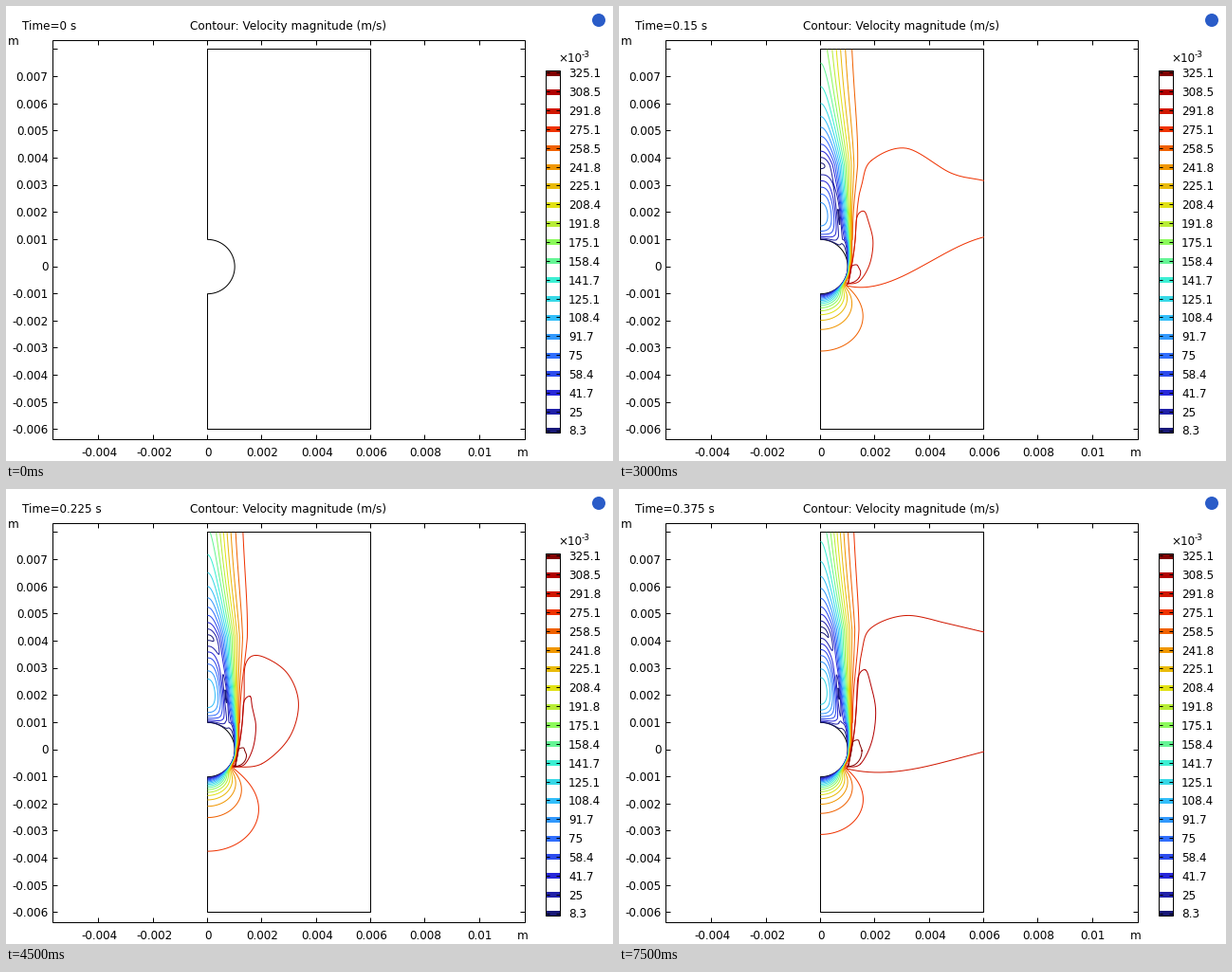
Recreate the animation shown at these times as a matplotlib script. Size 640 by 480 pixels, loop 8000 ms.

```python
import numpy as np
import matplotlib.pyplot as plt
from matplotlib.animation import FuncAnimation
from matplotlib.colors import LinearSegmentedColormap
from matplotlib.patches import Circle, Rectangle

W, H, FRAMES, STEP = 640, 480, 16, 500
PX = 0.72                      # one pixel in points at 100 dpi
X0, Y0, MM = 212.5, 275.0, 28.65
RIGHT, TOP, BOTTOM = 384.5, 45.5, 446.5

LEVELS = (8.341 + 16.674 * np.arange(20)) / 1000
STOPS = np.array([*range(0, 19, 2), 19]) / 19
RAINBOW = ("#181878 #2828dc #3070ff #32c0fa #3cf0d2 #8cfa5a "
           "#e1e114 #f09600 #f03200 #b40000 #820000").split()
COLORS = LinearSegmentedColormap.from_list("flow", list(zip(STOPS, RAINBOW)))(
    np.linspace(0, 1, 20))

gx = np.concatenate([np.arange(0, 1.5, .012), np.arange(1.5, 6.01, .05)])
gy = np.concatenate([np.arange(-6, -1.4, .04), np.arange(-1.4, 1.4, .012),
                     np.arange(1.4, 8.001, .03)])
x, y = np.meshgrid(gx, gy)
r = np.hypot(x, y)
gap = np.clip(r - 1, 0, None)
up = np.clip(y, 0, None)


def free_speed(t):
    return .2885 * np.sqrt(1 - np.exp(-t / .071))


def growth(t):
    """How far the wake has developed, from 0 to 1."""
    return 1 - np.exp(-t / .1)


def upstream():
    """Speed ratio ahead of the sphere: potential-like flow with a thin boundary layer."""
    s2 = (x / np.maximum(r, .01)) ** 2
    drop = 1.35 / (r ** 3 + .35) * (1 - .9 * s2 - .85 * s2 ** 2)
    delta = .02 + .04 * np.sqrt(s2)
    return (1 + np.clip(-drop, -1, .12)) * (1 - np.exp(-(gap / delta) ** 1.3))


def shear(h):
    """Profile across the shear layer, 0 in the wake and 1 outside."""
    wall = np.sqrt(np.clip(1 - h ** 2, 0, None))
    mid = .8 + .4 * np.exp(-h / 3.5) - .14 * np.exp(-h / .4)
    power = np.where(h < 1, 1.3 + 7.7 * h ** 2, 1.9 + 7.1 * np.exp(-(h - 1) / 1.2))
    return 1 - np.exp(-np.clip((x - wall) / (mid - wall), 0, 4) ** power)


AHEAD, SHEAR = upstream(), shear(up)
EDGE = 1.02 + .1 * np.exp(-(up / 2.2) ** 2)


def speed_field(t):
    g = growth(t)
    end, back = 1 + 3.5 * g, .49 * g
    tau = np.clip(gap / (end - 1), 0, 1)
    reverse = back * np.sin(np.pi * tau ** .62) * np.clip(1 - (x / .8) ** 2, 0, 1)
    recovery = 1 - np.exp(-np.clip(up - end, 0, None) / (2.2 * np.tanh(t / .05)))
    core = (1 - .37 * g) * recovery - reverse
    axial = core + (EDGE - core) * SHEAR
    centre = 1 + .31 * (end - 1)
    radial = (.35 * back * np.minimum(1, gap / .3) * np.sin(np.pi * np.clip(x / 1.2, 0, 1))
              * np.tanh((up - centre) / 1.2) * np.exp(-((up - 2.2) / 1.8) ** 4))
    return free_speed(t) * np.where(y < 0, AHEAD, np.hypot(axial, radial))


def spline(points, n=14):
    """Catmull-Rom curve through the points."""
    p = np.array(points)
    p = np.vstack([2 * p[0] - p[1], p, 2 * p[-1] - p[-2]])
    u = np.linspace(0, 1, n)[:, None]
    return np.vstack([b + u / 2 * (c - a + u * (2 * a - 5 * b + 4 * c - d
                                                + u * (3 * (b - c) + d - a)))
                      for a, b, c, d in zip(p, p[1:], p[2:], p[3:])])


def leg(d):
    """Point on the shear layer, d pixels above the separation point."""
    return 242 + 12 * (1 - np.exp(-d / 50)), 291 - d


def side_loop(excess, g):
    """Closed line beside the sphere; it widens as its level nears the free speed."""
    w = max(2.35 / excess - 6, 9)
    h = max(136 * g * (1 - (excess / .145) ** 2), 18)
    inner = [leg(f * h) for f in (0, .3, .6, .92)]
    crest = (leg(h)[0] + 3 + .17 * w, 291 - h)
    outer = [(244 + a * w, 291 - b * h)
             for a, b in ((.8, .85), (1, .57), (.85, .25), (.4, .01))]
    return spline([*inner, crest, *outer, (241, 293), leg(0)])


def open_line(excess):
    """Line that leaves through the side wall, or through the top at low excess."""
    reach = 1000 * np.sqrt(.018 - excess)
    s = np.linspace(0, 1, 50)
    fall = 295 + (reach - 81) * s * s * (3 - 2 * s) + 36 * s * (1 - s)
    lower = np.column_stack([240 + (RIGHT - 240) * s, fall])
    if excess > .005:
        wall = 214 - reach
        crest = wall / 2 + 58
        out = [(256, crest + 38), (266, crest + 13), (303, crest),
               (350, wall - 8), (RIGHT, wall)]
    else:
        out = [(254, 175), (260, 130), (259, 100), (256, TOP)]
    upper = spline([leg(0), leg(36), leg(80), *out])
    return np.vstack([upper[::-1], lower])


plt.rcParams["font.family"] = "DejaVu Sans"
fig = plt.figure(figsize=(6.4, 4.8), dpi=100, facecolor="white")
ax = fig.add_axes([0, 0, 1, 1])
ax.set(xlim=(0, W), ylim=(H, 0))
ax.axis("off")


def tick(x1, y1, x2, y2):
    ax.plot(np.floor([x1, x2]), np.floor([y1, y2]), color="black", lw=PX,
            solid_capstyle="butt")


def box(px, py, w, h):
    ax.add_patch(Rectangle((px, py), w, h, fill=False, lw=PX, zorder=3))


def label(px, py, s, ha="left", size=12):
    return ax.text(px, py, s, fontsize=size * PX, ha=ha, va="baseline")


def plot_frame():
    l, t, rt, b = 49, 36, 547, 457
    box(l, t, rt - l, b - t)
    for k in range(-4, 11, 2):
        px = X0 + MM * k
        tick(px, t, px, t + 5)
        tick(px, b - 5, px, b)
        label(px + .8, 475, f"{k / 1000:g}", "center")
    for k in range(-6, 9):
        py = Y0 - MM * k
        tick(l, py, l + 5, py)
        tick(rt - 5, py, rt, py)
        if k < 8:
            label(44.5, py + 4.4, f"{k / 1000:g}", "right")
    label(2, 41, "m")
    label(539, 475, "m")


def domain():
    a = np.linspace(-np.pi / 2, np.pi / 2, 80)
    xs = np.concatenate([[X0], X0 + MM * np.cos(a), [X0, RIGHT, RIGHT, X0]])
    ys = np.concatenate([[TOP], Y0 + MM * np.sin(a), [BOTTOM, BOTTOM, TOP, TOP]])
    ax.plot(xs, ys, color="black", lw=PX)


def color_bar():
    for k, (v, c) in enumerate(zip(LEVELS, COLORS)):
        py = 448 - 19.85 * k
        ax.add_patch(Rectangle((569, round(py - 3)), 15, 6, color=c, lw=0))
        tick(569, py, 573, py)
        tick(580, py, 584, py)
        label(593, py + 4.5, f"{v * 1000:.1f}".replace(".0", ""))
    box(569, 68, 15, 382)
    label(582, 59, "×10")
    label(606.5, 54, "-3", size=9)


plot_frame()
domain()
color_bar()
label(194, 25, "Contour: Velocity magnitude (m/s)")
ax.add_patch(Circle((625, 15), 7, color="#2a5cc8", lw=0))
clock = label(17, 25, "")
drawn = []


def update(i):
    while drawn:
        drawn.pop().remove()
    t = i * .025
    clock.set_text(f"Time={t:.3g} s")
    if i == 0:
        return
    excess = LEVELS / free_speed(t) - 1
    near = excess < -.013
    drawn.append(ax.contour(X0 + MM * gx, Y0 - MM * gy, speed_field(t), levels=LEVELS[near],
                            colors=COLORS[near], linewidths=PX, zorder=4))
    for e, c in zip(excess, COLORS):
        if -.013 <= e < .17:
            curve = open_line(e) if e < .018 else side_loop(e, growth(t))
            drawn.extend(ax.plot(*curve.T, color=c, lw=PX, zorder=4))


anim = FuncAnimation(fig, update, frames=FRAMES, interval=STEP, repeat=True,
                     repeat_delay=0, init_func=lambda: None)
plt.show()
```
